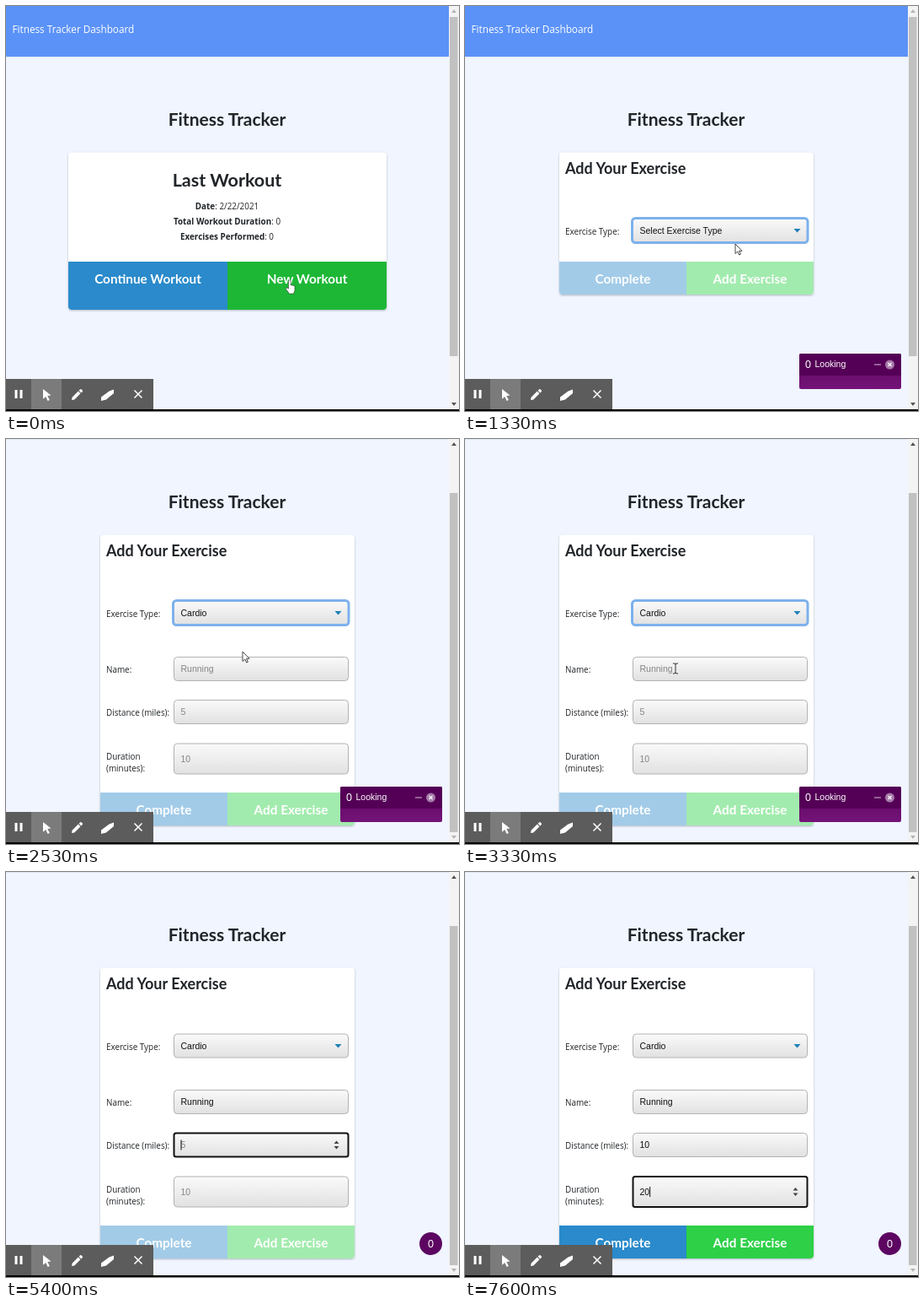
These frames come from a looping animation (538 by 480 pixels, 8 s). An HTML page:

```html
<!DOCTYPE html>
<html lang="en">
<head>
<meta charset="utf-8">
<title>Fitness Tracker</title>
<style>
  html, body { margin: 0; width: 100%; height: 100%; overflow: hidden; background: #f0f5ff; }
  svg { display: block; width: 538px; height: 480px; }
  .head { font-family: Lato, sans-serif; font-weight: 700; fill: #212529; }
  .button { font: 700 15.3px Lato, sans-serif; fill: #fff; }
  .body { font: 9.9px "Open Sans", sans-serif; fill: #212529; }
  .nav { font: 11.75px "Open Sans", sans-serif; fill: #fff; }
  .field { font: 10.5px "Liberation Sans", Arial, sans-serif; fill: #111; }
  .hint { fill: #858585; }
  .chat { font: 10.5px "Liberation Sans", Arial, sans-serif; fill: #fff; }
  .mid { text-anchor: middle; }
  .bold { font-weight: 700; }
</style>
</head>
<body>
<svg viewBox="0 0 538 480" xmlns="http://www.w3.org/2000/svg">
  <defs>
    <linearGradient id="shade" x2="0" y2="1">
      <stop offset="0" stop-color="#fafafa"/><stop offset="1" stop-color="#e1e1e1"/>
    </linearGradient>
    <linearGradient id="purple" x2="0" y2="1">
      <stop offset="0" stop-color="#5c0661"/><stop offset="1" stop-color="#741378"/>
    </linearGradient>
    <filter id="shadow" x="-5%" y="-5%" width="110%" height="115%">
      <feDropShadow dx="0" dy="1" stdDeviation="1.2" flood-color="#6d7480" flood-opacity=".5"/>
    </filter>
  </defs>
  <g id="page"></g>
  <g id="overlay"></g>
  <g id="toolbar">
    <path d="M0 442H175V478H0z" fill="#5c5c5c"/>
    <path d="M30 442H66V478H30z" fill="#7b7b7b"/>
    <g fill="#fff">
      <path d="M10.500 455h3v10h-3zM16.500 455h3v10h-3z"/>
      <path d="M44 454l9.500 7.500-4.200.5 2.500 5-2.200 1-2.400-5-3.200 2.800z"/>
      <path d="M78 467l.6-3.300 7.200-7.200 2.700 2.700-7.200 7.200zM86.600 455.700l1.500-1.500q.7-.5 1.300 0l1.400 1.400q.6.7 0 1.300l-1.500 1.500z"/>
      <path d="M113 463.500l9.500-7 5.500-2v4.500l-9 7.500-6 1.500z"/>
    </g>
    <path d="M152.500 455.500l9 9m0-9l-9 9" stroke="#fff" stroke-width="1.500"/>
  </g>
  <path d="M0 478H538V480H0z" fill="#000"/>
  <g id="pointer"></g>
</svg>
<script>
const LOOP = 8000;
const layer = id => document.getElementById(id);

// Each step changes only the listed properties, starting at the given time.
const steps = [
  [0, { view: 'home', scroll: 0, cursor: ['hand', 338, 332], chat: 0, type: 'Select Exercise Type',
        focus: '', name: '', distance: '', duration: '', caret: false }],
  [330, { view: 'form', cursor: ['arrow', 336, 327] }],
  [530, { cursor: ['arrow', 334, 310] }],
  [730, { cursor: ['arrow', 330, 284], chat: 121 }],
  [930, { cursor: ['arrow', 324, 268] }],
  [1130, { focus: 'type' }],
  [1330, { cursor: ['arrow', 321, 282] }],
  [1530, { cursor: ['arrow', 313, 296] }],
  [1730, { cursor: null }],
  [1930, { type: 'Cardio' }],
  [2330, { scroll: 30 }],
  [2530, { scroll: 60, cursor: ['arrow', 281, 252] }],
  [2930, { cursor: ['arrow', 263, 256] }],
  [3330, { cursor: ['beam', 250, 272] }],
  [3730, { cursor: null, focus: 'name', caret: true }],
  [3930, { chat: 89 }],
  [4130, { chat: 57 }],
  [4330, { chat: 27 }],
  [4660, { name: 'R' }],
  [4860, { name: 'Run' }],
  [5060, { name: 'Runni' }],
  [5200, { name: 'Running' }],
  [5400, { focus: 'distance' }],
  [5800, { distance: '1' }],
  [6400, { distance: '10' }],
  [6800, { focus: 'duration' }],
  [7200, { duration: '2' }],
  [7400, { duration: '20' }]
];

const rect = (x, y, w, h, fill, more = '') =>
  `<rect x="${x}" y="${y}" width="${w}" height="${h}" fill="${fill}" ${more}/>`;
const text = (x, y, value, cls, more = '') =>
  `<text x="${x}" y="${y}" class="${cls}" ${more}>${value}</text>`;
const heading = (x, y, size, value, cls = '') =>
  text(x, y, value, 'head ' + cls, `font-size="${size}"`);

function card(x, w, split, bottom, buttons) {
  const half = w / 2;
  const bars = buttons.map(([label, fill], i) => {
    const left = x + i * half;
    const right = left + half;
    const d = i
      ? `M${left} ${split}H${right}V${bottom - 4}q0 4-4 4H${left}z`
      : `M${left} ${split}H${right}V${bottom}H${left + 4}q-4 0-4-4z`;
    return `<path d="${d}" fill="${fill}"/>` + text(left + half / 2, split + 26, label, 'button mid');
  });
  return rect(x, 173.5, w, bottom - 173.5, '#fff', 'rx="4" filter="url(#shadow)"') + bars.join('');
}

function home() {
  const fact = (y, label, value) =>
    text(262.5, y, `<tspan class="bold">${label}</tspan>: ${value}`, 'body mid');
  return card(74, 378, 303, 360, [['Continue Workout', '#2a8acb'], ['New Workout', '#1db735']])
    + heading(262.5, 214, 21.5, 'Last Workout', 'mid')
    + fact(241, 'Date', '2/22/2021')
    + fact(259, 'Total Workout Duration', '0')
    + fact(277, 'Exercises Performed', '0');
}

function box(y, h, ring) {
  if (ring === 'blue')
    return rect(198.5, y, 208.5, h, 'url(#shade)', 'rx="4" stroke="#7db1ec" stroke-width="3"');
  const line = ring ? 'rx="2.5" stroke="#111" stroke-width="2"' : 'rx="4" stroke="#b2b2b2"';
  return rect(199.5, y + .5, 207, h - 1, 'url(#shade)', line);
}

function input(s, key, y, h, hint, spinner) {
  const active = s.focus === key;
  const value = s[key];
  const middle = y + h / 2;
  let out = box(y, h, active) + text(207.5, middle + 3.5, value || hint, value ? 'field' : 'field hint');
  if (active && s.caret) {
    const width = value ? measure(value) : 0;
    out += rect(207.5 + width, middle - 6, 1, 12, '#111');
  }
  if (active && spinner)
    out += `<path d="M389.500 ${middle - 1.5}l3-3.500 3 3.500zM389.500 ${middle + 1.5}l3 3.500 3-3.500z" fill="#444"/>`;
  return out;
}

const pen = document.createElement('canvas').getContext('2d');
function measure(value) {
  pen.font = '10.5px "Liberation Sans", Arial, sans-serif';
  return pen.measureText(value).width;
}

function form(s) {
  const open = s.type === 'Cardio';
  const ready = s.name && s.distance && s.duration;
  const split = open ? 479 : 303;
  let out = card(112, 302, split, split + 39, [
    ['Complete', ready ? '#2a8acb' : '#a2cbe8'],
    ['Add Exercise', ready ? '#2dd047' : '#a2ebae']
  ]);
  out += heading(119, 198.5, 18, 'Add Your Exercise')
    + text(119, 270.5, 'Exercise Type:', 'body')
    + box(251.5, 29, s.focus === 'type' ? 'blue' : '')
    + text(207.5, 270, s.type, 'field')
    + '<path d="M390.500 264h8l-4 4.500z" fill="#1f7fb8"/>';
  if (open) {
    out += text(119, 337, 'Name:', 'body') + input(s, 'name', 318, 29, 'Running')
      + text(119, 388, 'Distance (miles):', 'body') + input(s, 'distance', 369, 29, '5', true)
      + text(119, 439.5, 'Duration', 'body') + text(119, 453.5, '(minutes):', 'body')
      + input(s, 'duration', 420.5, 37, '10', true);
  }
  return out;
}

function scrollbar(scroll) {
  const tone = off => off ? '#b5b5b5' : '#555';
  return rect(526, 0, 12, 478, '#f3f3f3')
    + rect(527, 13 + scroll * .85, 9.5, 402, '#c1c1c1')
    + `<path d="M529 8l3-4 3 4z" fill="${tone(!scroll)}"/>`
    + `<path d="M529 470l3 4 3-4z" fill="${tone(scroll === 60)}"/>`;
}

function chat(width) {
  if (!width) return '';
  const left = 518 - width;
  if (width < 121)
    return rect(left, 427, width, 27, '#5c0661', 'rx="13.5"')
      + text(left + (width === 27 ? 10 : 9.5), 444.5, '0', 'chat', 'style="font-size:12.500px"');
  return rect(397, 412, 121, 42, 'url(#purple)', 'rx="2"')
    + rect(397, 412, 121, 26, '#540056', 'rx="2"')
    + text(404, 429, '0', 'chat', 'style="font-size:12.500px"')
    + text(415.5, 428, 'Looking', 'chat')
    + rect(486, 424.5, 8, 1, '#d9bddb')
    + '<circle cx="504.500" cy="425" r="5.500" fill="#a77aaa"/>'
    + '<path d="M502.500 423l4 4m0-4l-4 4" stroke="#fff" stroke-width="1.200"/>';
}

const shapes = {
  arrow: '<path d="M0 0V11.500L2.700 9l2 4 1.700-.8-1.900-3.900H8z" fill="#fff" stroke="#333" stroke-width=".9"/>',
  beam: '<path d="M-3-6h2l1 1 1-1h2M-3 6h2l1-1 1 1h2M0-5V5" fill="none" stroke="#333"/>',
  hand: '<path d="M-2.500-6.500q1.500-1.500 2.500 0v5l5 1.200v5.300l-1.500 4h-5l-4-5.500q0-2 1.500-1.500l1.500 1z" fill="#fff" stroke="#333" stroke-width=".6"/>'
};

function render(s) {
  layer('page').innerHTML = rect(0, 0, 538, 480, '#f0f5ff')
    + `<g transform="translate(0 ${-s.scroll})">`
    + rect(0, 0, 526, 61, '#dfe7f5') + rect(0, 0, 526, 60, '#5b92f8')
    + text(7.5, 31.5, 'Fitness Tracker Dashboard', 'nav')
    + heading(262.5, 142, 21, 'Fitness Tracker', 'mid')
    + (s.view === 'home' ? home() : form(s)) + '</g>';
  layer('overlay').innerHTML = scrollbar(s.scroll) + chat(s.chat);
  layer('pointer').innerHTML = s.cursor
    ? `<g transform="translate(${s.cursor[1]} ${s.cursor[2]})">${shapes[s.cursor[0]]}</g>` : '';
}

let shown = -1;
const start = performance.now();
function tick() {
  const time = (performance.now() - start) % LOOP;
  const count = steps.filter(([at]) => at <= time).length;
  if (count !== shown) {
    shown = count;
    render(Object.assign({}, ...steps.slice(0, count).map(([, change]) => change)));
  }
  requestAnimationFrame(tick);
}
tick();
</script>
</body>
</html>
```
